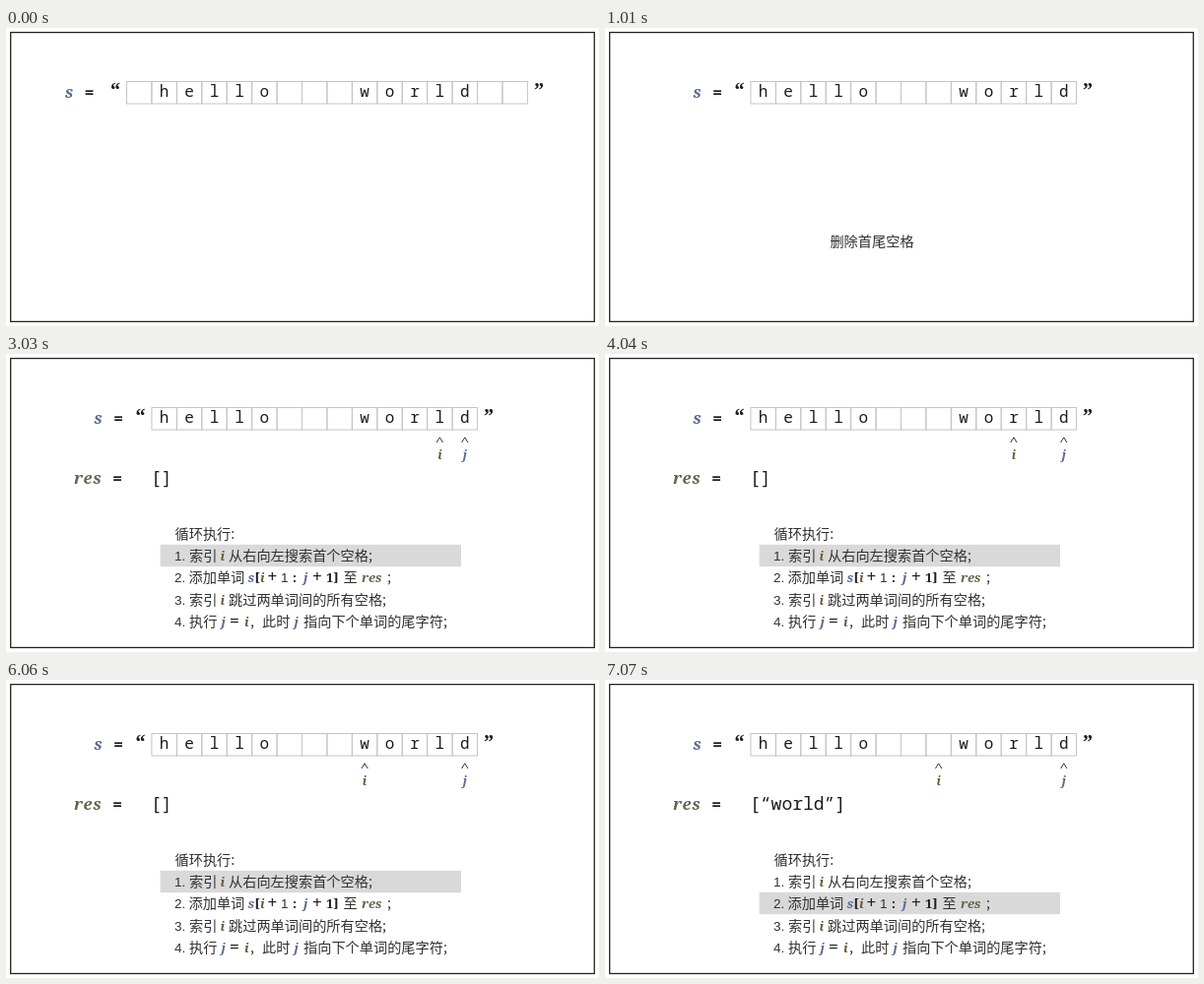
Recreate the animation shown at these times as an HTML page with a canvas. Size 602 by 303 pixels, loop 8 s.

```html
<!DOCTYPE html>
<html lang="zh">
<head>
<meta charset="utf-8">
<title>Reverse words: two pointers</title>
<style>
  html, body { margin: 0; width: 100%; height: 100%; overflow: hidden; background: #fff; }
  canvas { display: block; }
</style>
</head>
<body>
<canvas id="stage" width="602" height="303"></canvas>
<script>
const ctx = document.getElementById('stage').getContext('2d');

const LOOP = 8000, STEP = 1010;
const CELL = 25.43, ROW_LEFT = 122.5, ROW_TOP = 54.5, ROW_HEIGHT = 22.5;
const CHARS = ' hello   world  ';

const INK = '#1c1c1c', SOFT_INK = '#303030';
const BLUE = '#5b6a94', OLIVE = '#62654a', BROWN = '#6b5636';
const mono = size => `500 ${size}px "Noto Sans Mono", monospace`;
const math = size => `italic bold ${size}px "Noto Serif", serif`;
const bold = size => `bold ${size}px "Open Sans", sans-serif`;
const QUOTE = 'bold 20px "Liberation Serif", serif';
const HAN = '300 14.2px "Noto Sans CJK SC", "Noto Sans CJK", sans-serif';
const NUM = '13.5px "Liberation Sans", sans-serif';

// i and j are cell indices; line is the highlighted rule.
const STATES = [
  { first: 0, last: 15 },
  { first: 1, last: 13, caption: '删除首尾空格' },
  { i: 13, caption: '初始化', res: '[]' },
  { i: 12, line: 1, res: '[]' },
  { i: 11, line: 1, res: '[]' },
  { i: 10, line: 1, res: '[]' },
  { i: 9, line: 1, res: '[]' },
  { i: 8, line: 2, res: '[“world”]' },
].map(state => ({ first: 1, last: 13, j: 13, ...state }));

function text(str, x, y, font, color = INK, align = 'left') {
  ctx.font = font;
  ctx.fillStyle = color;
  ctx.textAlign = align;
  ctx.fillText(str, x, y);
}

const cellX = index => ROW_LEFT + index * CELL;
const cellMid = index => cellX(index) + CELL / 2;

function drawString({ first, last }) {
  const left = cellX(first), right = cellX(last + 1);
  ctx.strokeStyle = '#c4c4c4';
  ctx.lineWidth = 1;
  for (let k = first; k <= last; k++) {
    ctx.strokeRect(cellX(k), ROW_TOP, CELL, ROW_HEIGHT);
    text(CHARS[k], cellMid(k), 70.3, mono(16), INK, 'center');
  }
  const shift = first ? 29.5 : 0;
  text('s', 64 + shift, 71, math(16.5), BLUE, 'center');
  text('=', 84.5 + shift, 71, bold(16), INK, 'center');
  text('“', left - 11.5, 70, QUOTE, INK, 'center');
  text('”', right + 11.5, 70, QUOTE, INK, 'center');
}

function caret(index) {
  const x = cellMid(index);
  ctx.strokeStyle = '#333';
  ctx.lineWidth = 1;
  ctx.beginPath();
  ctx.moveTo(x - 3.2, 90);
  ctx.lineTo(x, 84.8);
  ctx.lineTo(x + 3.2, 90);
  ctx.stroke();
}

function drawPointers({ i, j }) {
  const together = i === j, spread = together ? 8 : 0;
  caret(j);
  if (together) text(',', cellMid(j), 107, math(12), INK, 'center');
  else caret(i);
  text('i', cellMid(i) - spread, 107, math(12.5), BROWN, 'center');
  text('j', cellMid(j) + spread, 107, math(12.5), BLUE, 'center');
}

function drawResult(res) {
  ctx.letterSpacing = '0.8px';
  text('res', 69, 132, math(16.5), OLIVE);
  ctx.letterSpacing = '0px';
  text('=', 113, 132, bold(16), INK, 'center');
  text(res, 147, 131.5, mono(18));
}

function drawRules(line) {
  ctx.fillStyle = '#d9d9d9';
  ctx.fillRect(156.6, 171.8 + line * 22, 305.4, 22.4);

  const variable = (name, x, y) =>
    text(name, x, y, math(13), { i: BROWN, j: BLUE, s: BLUE, res: OLIVE }[name]);
  const symbol = (str, x, y) => text(str, x, y, 'bold 13px "Noto Serif", serif');
  const operator = (str, x, y) => text(str, x, y, '17px "Noto Sans", sans-serif');
  const han = (str, x, y) => text(str, x, y, HAN, SOFT_INK);
  const rows = [210, 232, 255, 277];

  han('循环执行:', 171.5, 188);
  rows.forEach((y, k) => text(`${k + 1}.`, 171, y, NUM, SOFT_INK));

  han('索引', 186, rows[0]);
  variable('i', 217.5, rows[0]);
  han('从右向左搜索首个空格;', 226, rows[0]);

  han('添加单词', 185.5, rows[1]);
  variable('s', 245.5, rows[1]);
  symbol('[', 252.5, rows[1]);
  variable('i', 258, rows[1]);
  operator('+', 265.5, rows[1]);
  text('1', 279, rows[1], NUM, SOFT_INK);
  symbol(':', 291, rows[1]);
  variable('j', 302, rows[1]);
  operator('+', 311, rows[1]);
  symbol('1]', 325, rows[1]);
  han('至', 342.5, rows[1]);
  variable('res', 361, rows[1]);
  han(';', 387, rows[1]);

  han('索引', 186, rows[2]);
  variable('i', 217.5, rows[2]);
  han('跳过两单词间的所有空格;', 226, rows[2]);

  han('执行', 186, rows[3]);
  variable('j', 218.5, rows[3]);
  operator('=', 227, rows[3]);
  variable('i', 242, rows[3]);
  han(',', 248, rows[3]);
  han('此时', 260, rows[3]);
  variable('j', 292.5, rows[3]);
  han('指向下个单词的尾字符;', 302, rows[3]);
}

function draw(time) {
  const state = STATES[Math.min(Math.floor((time % LOOP) / STEP), STATES.length - 1)];
  ctx.fillStyle = '#fff';
  ctx.fillRect(0, 0, 602, 303);
  ctx.strokeStyle = '#222';
  ctx.lineWidth = 1.3;
  ctx.strokeRect(4.7, 4.5, 592.6, 294);

  drawString(state);
  if (state.res) {
    drawPointers(state);
    drawResult(state.res);
  }
  if (state.caption) text(state.caption, 271, 221.5, HAN, SOFT_INK, 'center');
  if (state.line) drawRules(state.line);
}

const start = performance.now();
function tick() {
  draw(performance.now() - start);
  requestAnimationFrame(tick);
}
tick();
</script>
</body>
</html>
```
